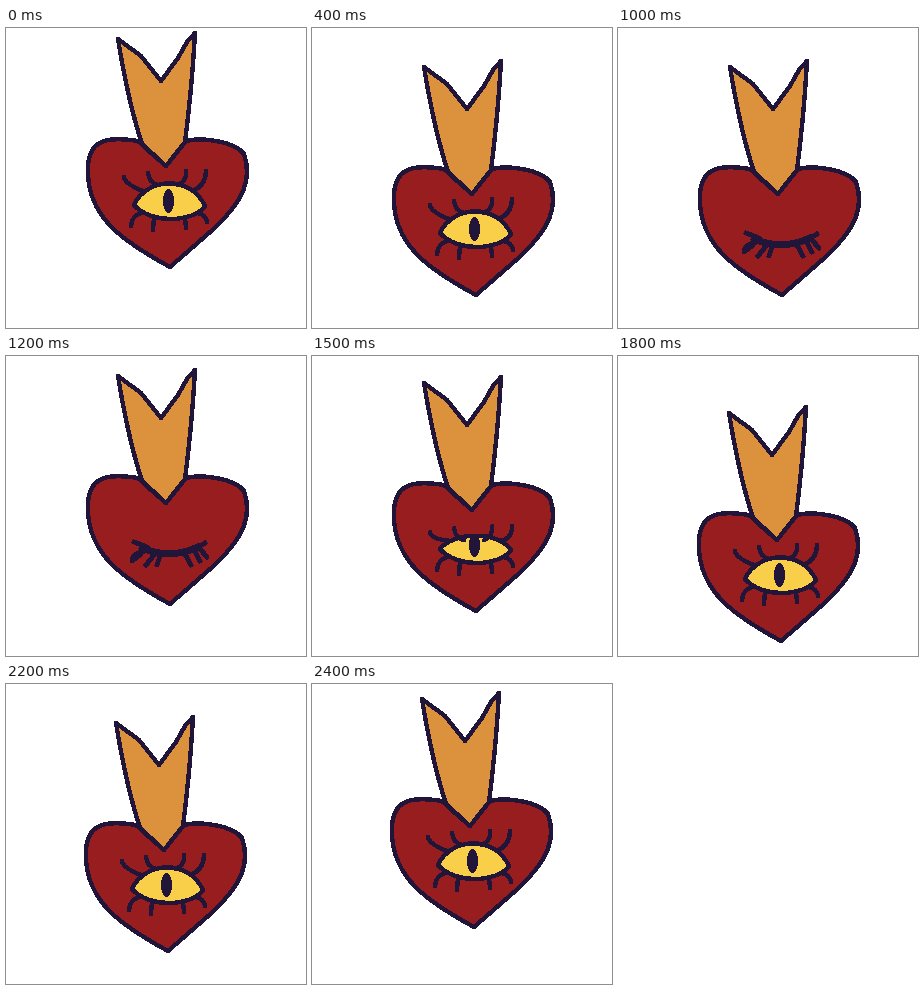
Recreate the animation shown at these times as an HTML page. Size 300 by 300 pixels, loop 2500 ms.

```html
<!DOCTYPE html>
<html lang="en">
<head>
<meta charset="utf-8">
<title>Winking heart</title>
<style>
  html, body { margin: 0; height: 100%; overflow: hidden; background: #fff; }
  svg { display: block; width: 100vw; height: 100vh; }
  path { fill: none; stroke: #21153a; stroke-width: 4.4; stroke-linejoin: round; stroke-linecap: round; }
  .crown { fill: #dc913d; }
  .body { fill: #981d1e; }
  #eye { fill: #f9cf4a; }
  #closed path { stroke-width: 5; }
  #closed .lid { stroke-width: 7; }
</style>
</head>
<body>
<svg viewBox="0 0 300 300" shape-rendering="crispEdges">
  <clipPath id="opening"><path id="gap"/></clipPath>
  <g id="heart">
    <path class="crown" d="M136 116Q122 73 112 11L135 28 155 53 172 30 181 14 189 5Q186 60 179 114L160 138Z"/>
    <path class="body" d="M160 138L145 125 132 113C112 110 82 106 82 140C80 190 120 215 164 239L203 205C240 172 246 150 238 126C228 113 195 109 180 113Z"/>
    <g id="open">
      <path id="eye"/>
      <ellipse cx="162.5" cy="173" rx="5.5" ry="12" fill="#21153a" clip-path="url(#opening)"/>
      <path id="lashes"/>
      <path d="M136 185Q126 187 125 198M148 190L147 202M179 190L180 200M192 185Q200 187 201 194"/>
    </g>
    <g id="closed">
      <path class="lid" d="M136 183Q164 195 192 182"/>
      <path d="M128 177L141 182M199 178L188 184M137 187Q127 188 126 196L134 190M148 190L140 200M154 191L151 200M179 189L185 200M189 187L194 196M194 184L201 192"/>
    </g>
  </g>
</svg>
<script>
const LOOP = 2500, STEP = 100;
const $ = id => document.getElementById(id);
const linear = p => p;
const ease = p => (1 - Math.cos(Math.PI * p)) / 2;
const ramp = (t, from, to) => Math.min(1, Math.max(0, (t - from) / (to - from)));

// Two bounces: soft at the ends of the loop, even in the middle.
const height = t =>
  56 * ease(ramp(t, 100, 700)) - 58 * linear(ramp(t, 700, 1320)) +
  58 * linear(ramp(t, 1320, 1900)) - 56 * ease(ramp(t, 1900, LOOP));

function draw() {
  const t = Math.floor(performance.now() % LOOP / STEP) * STEP;
  const x = Math.round(-2 * ramp(t, 1500, 1900));
  $('heart').setAttribute('transform', `translate(${x} ${Math.round(height(t))})`);

  const shut = ramp(t, 700, 1000) - ramp(t, 1300, 1650);
  const closed = shut > .95;
  $('open').style.display = closed ? 'none' : '';
  $('closed').style.display = closed ? '' : 'none';

  // The upper lid sinks towards the lower one, carrying its lashes.
  const drop = 26 * shut, y = v => v + drop;
  const shape = `M128 177C${140} ${y(150)} 184 ${y(146)} 199 178C188 194 146 197 128 177Z`;
  $('eye').setAttribute('d', shape);
  $('gap').setAttribute('d', shape);
  $('lashes').setAttribute('d',
    `M118 ${y(149)}Q119 ${y(156)} 137 ${y(163 - drop * .5)}M142 ${y(145)}Q143 ${y(155)} 152 ${y(157)}` +
    `M180 ${y(143)}Q181 ${y(153)} 172 ${y(157)}M200 ${y(143)}Q200 ${y(157)} 187 ${y(163 - drop * .5)}`);
  requestAnimationFrame(draw);
}
draw();
</script>
</body>
</html>
```
